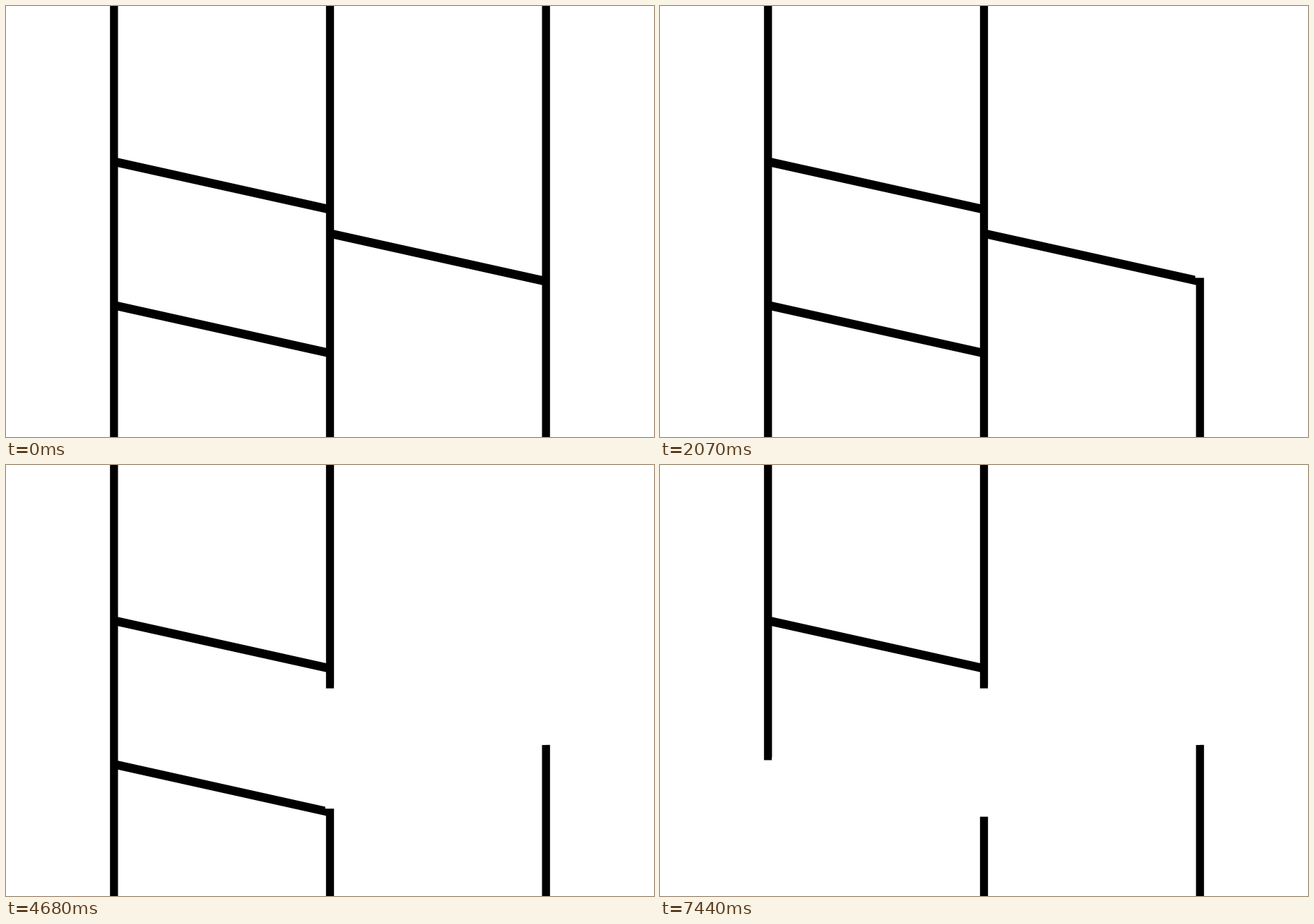
Write an HTML page with a canvas that moves like this. It is 917 px wide and 611 px high and loops after 8000 ms.

```html
<!DOCTYPE html>
<html lang="en">
<head>
<meta charset="utf-8">
<title>Ladder path</title>
<style>
  html, body { margin: 0; width: 100%; height: 100%; overflow: hidden; background: #fff; }
  canvas { display: block; }
</style>
</head>
<body>
<canvas id="stage" width="917" height="611"></canvas>
<script>
const W = 917, H = 611, LOOP = 8000, TICK = 30;
const ctx = document.getElementById('stage').getContext('2d');

const BAR = 11.32, RUNG = 12.4, HALF = BAR / 2;
const [left, mid, right] = [W / 6, W / 2, W * 5 / 6];
const unit = H / 36, drop = 4 * unit;
const rungs = [[left, 13 * unit], [mid, 19 * unit], [left, 25 * unit]];
const rightRungY = rungs[1][1], leftRungY = rungs[2][1];

// Position of the eraser's leading edge along each leg: [tick, position].
const legs = {
  rightBar: [[1, 0], [2, 11.3], [54, 305.3], [55, 305.3], [71, 396.8]],
  rightRung: [[71, 758.5], [72, 758.5], [82, 702], [96, 622.8], [103, 583.2],
              [104, 583.2], [109, 555], [118, 504.1], [119, 504.1], [128, 452.8]],
  midBar: [[128, 328.2], [136, 373], [158, 498.6]],
  leftRung: [[158, 452.8], [159, 452.8], [163, 430.2], [173, 373.8], [174, 373.8],
             [183, 322.9], [186, 306], [187, 306], [190, 289], [203, 215.5],
             [204, 215.5], [216, 147.2]],
  leftBar: [[216, 430], [247, 605.5], [248, 612]]
};

function along(keys, tick) {
  if (tick <= keys[0][0]) return keys[0][1];
  for (let i = 1; i < keys.length; i++) {
    const [t0, v0] = keys[i - 1], [t1, v1] = keys[i];
    if (tick <= t1) return v0 + (v1 - v0) * (tick - t0) / (t1 - t0);
  }
  return keys[keys.length - 1][1];
}

function box(color, x0, y0, x1, y1) {
  if (x1 <= x0 || y1 <= y0) return;
  ctx.fillStyle = color;
  ctx.fillRect(x0, y0, x1 - x0, y1 - y0);
}

const erase = (...edges) => box('#fff', ...edges);
const eraseBar = (x, y0, y1) => erase(x - HALF - 1, y0, x + HALF + 1, y1);

function drawLadder() {
  erase(0, 0, W, H);
  ctx.lineWidth = RUNG;
  ctx.strokeStyle = '#000';
  for (const [x, y] of rungs) {
    ctx.beginPath();
    ctx.moveTo(x, y);
    ctx.lineTo(x + W / 3, y + drop);
    ctx.stroke();
  }
  for (const x of [left, mid, right]) box('#000', x - HALF, 0, x + HALF, H);
}

// Wipes a rung from its right end, then the joint where it meets the bar.
function eraseRung(barX, y, edge, end) {
  const inner = barX + HALF;
  erase(Math.max(edge, inner), y - 10, end, y + drop + 6.4);
  if (edge < inner) erase(edge - 0.5, y - HALF, inner + 1, y + HALF);
}

function draw(tick) {
  const at = name => along(legs[name], tick);
  drawLadder();
  if (tick > 1) eraseBar(right, 0, at('rightBar'));
  if (tick > 71) eraseRung(mid, rightRungY, at('rightRung'), right);
  if (tick > 128) eraseBar(mid, rightRungY - HALF, at('midBar'));
  if (tick > 158) eraseRung(left, leftRungY, at('leftRung'), mid - HALF);
  if (tick > 216) eraseBar(left, leftRungY - HALF, at('leftBar'));
}

function loop() {
  draw(Math.min(248, Math.floor(performance.now() % LOOP / TICK)));
  requestAnimationFrame(loop);
}
loop();
</script>
</body>
</html>
```
